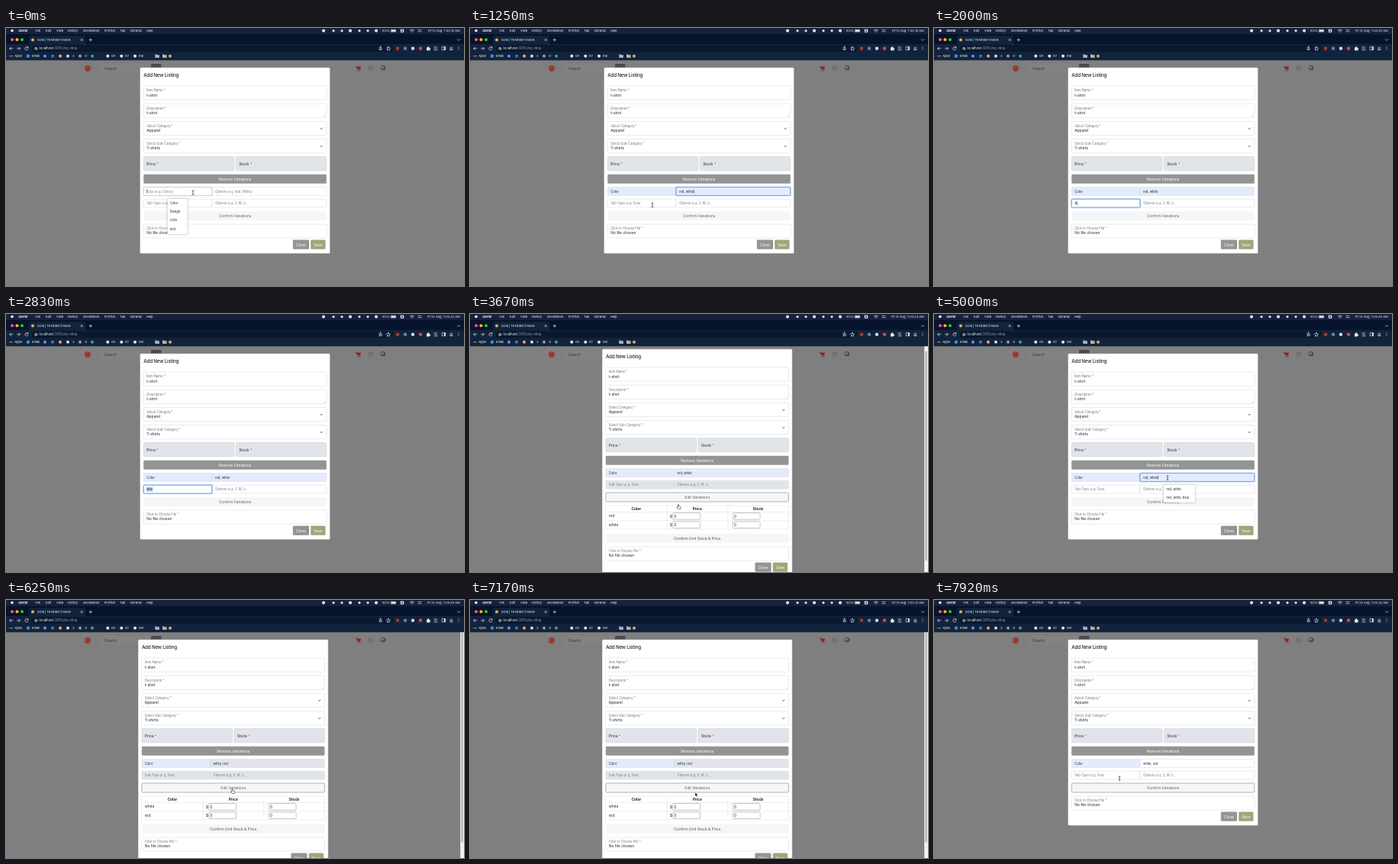
Write an HTML page that moves like this. It is 600 by 338 pixels and loops after 8000 ms.

```html
<!DOCTYPE html>
<html lang="en">
<head>
<meta charset="utf-8">
<title>Add New Listing</title>
<style>
  html, body { margin: 0; width: 100%; height: 100%; overflow: hidden; background: #7f7f7f; }
  svg { display: block; width: 100vw; height: 100vh; }
  text { font: 5px Inter, "Open Sans", sans-serif; letter-spacing: -.012em; fill: #212529; white-space: pre; }
  .bar text { font-size: 4.1px; fill: #eef1f6; }
  .bar .dim { fill: #97a3b4; }
  .bar .b { font-weight: 700; }
  .bar .s { font-size: 3.9px; }
  .line { fill: none; stroke: #dfe4ec; stroke-width: .7; stroke-linecap: round; stroke-linejoin: round; }
  .box { fill: #fff; stroke: #d3d7dc; stroke-width: .5; }
  .off { fill: #e1e5ea; stroke: #c5cad1; }
  .label { font-size: 4.25px; fill: #70767c; }
  .star { fill: #b07070; }
  .title { font-size: 6.25px; font-weight: 500; letter-spacing: -.03em; }
  .mid { text-anchor: middle; }
  .th { font-weight: 700; text-anchor: middle; }
  .row text, .menu text { font-size: 4.2px; }
  .menu rect { fill: #fff; stroke: #d0d0d0; stroke-width: .3; filter: drop-shadow(0 .8px 1.2px rgba(0,0,0,.3)); }
  .btn { fill: #949494; }
  .white { fill: #fff; }
  .soft { fill: #f5f6f7; stroke: none; }
  .soft.on { stroke: #7d838a; stroke-width: .6; }
  #ring { fill: none; stroke: #6f9ff0; stroke-width: .8; }
  #glow { fill: none; stroke: #0d6efd; stroke-opacity: .24; stroke-width: 1.5; }
  .hide { display: none; }
</style>
</head>
<body>
<svg viewBox="0 0 600 338" preserveAspectRatio="none">
  <rect width="600" height="338" fill="#7f7f7f"/>

  <!-- page header -->
  <circle cx="107" cy="53" r="4" fill="#993a35"/>
  <path d="M125 46.5H190V59H125Z" fill="#828282"/>
  <text x="129" y="54.9" fill="#333" style="fill:#383838">Search</text>
  <rect x="190" y="47" width="13.5" height="12" rx="1.2" fill="#4b4b4b"/>
  <path d="M458 50h1.4l1 4h3.4l.8-3h-4.6z" fill="#8d2020" stroke="#8d2020" stroke-width=".7"/>
  <g fill="#8d2020"><circle cx="460.8" cy="55.7" r=".8"/><circle cx="463.4" cy="55.7" r=".8"/></g>
  <path d="M475 50.5h5.6v4.8H475zM475 52.5h5.6" fill="none" stroke="#5f5f5f" stroke-width=".6"/>
  <circle cx="494" cy="52.3" r="3.3" fill="#39536b"/>
  <circle cx="493.2" cy="51.6" r="1.5" fill="#7e8d91"/>

  <!-- scrollbar -->
  <g id="scroll">
    <rect x="595.2" y="42" width="4.8" height="296" fill="#f3f3f3"/>
    <rect id="thumb" x="596.2" y="43" width="2.8" height="275" rx="1.4" fill="#bcbcbc"/>
  </g>

  <g id="modal">
    <rect id="sheet" x="175.4" y="51.8" width="249.2" height="243.8" rx="1.6" fill="#fff" stroke="#6f6f6f" stroke-width=".4"/>
    <text class="title" x="180.3" y="63.6">Add New Listing</text>
    <g id="fields"></g>
    <rect class="btn" x="180.2" y="191.8" width="239.6" height="12" rx="1.3"/>
    <text class="mid white" x="300" y="199.7">Remove Variations</text>

    <g class="row">
      <rect id="typeBox" class="box" x="180.3" y="208.6" width="89.7" height="10.8" rx="1"/>
      <rect id="optBox" class="box" x="270" y="208.6" width="149.7" height="10.8" rx="1"/>
      <rect id="subBox" class="box" x="180.3" y="224.2" width="89.7" height="10.8" rx="1"/>
      <rect id="subOptBox" class="box" x="270" y="224.2" width="149.7" height="10.8" rx="1"/>
      <rect id="glow" height="11.6" rx="1.3"/>
      <rect id="ring" height="10.8" rx="1"/>
      <rect id="mark" x="184.1" y="226.6" height="5.9" fill="#a9cbf8"/>
      <text id="typeText" x="184.2" y="215.5"></text>
      <text id="optText" x="274" y="215.5"></text>
      <text id="subText" x="184.2" y="231.1"></text>
      <text id="subOptText" x="274" y="231.1">Options (e.g. S, M, L)</text>
      <rect id="caret" width=".5" height="5.2" fill="#222"/>
    </g>

    <rect id="confirmBtn" class="soft" x="180.3" y="240" width="239.5" height="12" rx="1.3"/>
    <text id="confirmText" class="mid" x="300" y="248" style="fill:#5f6368"></text>

    <g id="table">
      <path d="M180.3 257.2H419.8V288H180.3ZM180.3 265.5H419.8M180.3 276.7H419.8M260.3 257.2V288M340.2 257.2V288" fill="none" stroke="#dadde1" stroke-width=".5"/>
      <text class="th" x="220.3" y="263.1">Color</text>
      <text class="th" x="300.2" y="263.1">Price</text>
      <text class="th" x="379.7" y="263.1">Stock</text>
      <g id="cells"></g>
      <rect class="soft" x="180.3" y="293.8" width="239.5" height="12" rx="1.3"/>
      <text class="mid" x="300" y="301.7" style="fill:#4f5357">Confirm Unit Stock &amp; Price</text>
    </g>

    <g id="low">
      <rect class="box" x="180.3" y="257" width="239.5" height="18" rx="1.3"/>
      <text class="label" x="184.2" y="264.2">Click to Choose File <tspan class="star">*</tspan></text>
      <text x="184.2" y="270.3">No file chosen</text>
      <rect class="btn" x="375.8" y="277.6" width="21.2" height="12.2" rx="1.3"/>
      <text class="mid white" x="386.4" y="285.6">Close</text>
      <rect x="399.2" y="277.6" width="19.3" height="12.2" rx="1.3" fill="#a0a67a"/>
      <text class="mid white" x="408.9" y="285.6">Save</text>
    </g>

    <g id="menuType" class="menu">
      <rect x="211.6" y="223.6" width="26.2" height="46.4" rx="1"/>
      <text x="214.8" y="231">Color</text><text x="214.8" y="242.2">Design</text>
      <text x="214.8" y="253.3">color</text><text x="214.8" y="264.5">test</text>
    </g>
    <g id="menuOpt" class="menu">
      <rect x="300.8" y="223.6" width="41.4" height="23.4" rx="1"/>
      <text x="304.5" y="231">red, white</text><text x="304.5" y="242.2">red, white, blue</text>
    </g>
  </g>

  <!-- browser and menu bar -->
  <g class="bar">
    <rect width="600" height="8" fill="#17213c"/>
    <rect y="8" width="600" height="13.5" fill="#06142b"/>
    <rect y="21" width="600" height="21.3" fill="#12233c"/>
    <path d="M28 21.3q2 0 2-2V12q0-1.8 1.8-1.8h70.4q1.8 0 1.8 1.8v7.3q0 2 2 2z" fill="#12233c"/>
    <rect x="33.5" y="22.6" width="474" height="8.6" rx="4.3" fill="#0a182d"/>
    <circle cx="8" cy="3.5" r="1.8" fill="#f2f4f8"/>
    <text class="b" x="16.2" y="5">Zelmir</text>
    <g id="menus"></g>
    <g id="dots"></g>
    <text x="492.5" y="5" class="s">100%</text>
    <path class="line" d="M504.5 2.2h6v2.8h-6z"/><path d="M505 2.6h5v2h-5z" fill="#fff"/>
    <rect x="516.8" y="1.4" width="4.4" height="4.4" rx=".8" fill="#f0f2f6"/>
    <text x="517.6" y="5" class="b" style="fill:#17213c;font-size:3.8px">A</text>
    <path class="line" d="M529.3 2.8q2.7-2.2 5.4 0M530.5 4.1q1.5-1.2 3 0M532 5.4v.1M540 2.4h4M540 4.7h4"/>
    <text id="clock" x="594.6" y="5" text-anchor="end"></text>

    <circle cx="35" cy="15.6" r="2" fill="#dfb260"/>
    <text x="40.6" y="17.1" class="s">Vuna | TR Binder's Nook</text>
    <path class="line" d="M98 14.4l2.4 2.4m0-2.4L98 16.8M109 15.6h3.6M110.8 13.8v3.6M591.4 14.8l1.7 1.7 1.7-1.7"/>
    <path class="line" d="M9 26.8H4.8m1.8-1.8L4.8 26.8l1.8 1.8M14.5 26.8h4m-1.7-1.8 1.7 1.8-1.7 1.8M28.7 25.6a2.1 2.1 0 1 0 .2 2M28.9 24.4v1.5h-1.5"/>
    <circle class="line" cx="39.2" cy="26.9" r="1.6"/><path class="line" d="M39.2 26.8v.8"/>
    <text x="43.6" y="28.4" style="font-size:4.4px">localhost<tspan class="dim">:3000/my-shop</tspan></text>
    <path class="line" d="M489 26v2.6h3.2V26M490.6 27.2v-3M489.6 25l1-1 1 1M501 24.3l.8 1.7 1.8.2-1.3 1.3.3 1.8-1.6-.9-1.6.9.3-1.8-1.3-1.3 1.8-.2z"/>
    <path class="line" d="M561 25h3.8M561 27h2.6M561 29h2M564.6 27.6v1.6M571.5 24.7h4.2v4h-4.2z"/>
    <path d="M573.8 24.7h1.9v4h-1.9z" fill="#dfe4ec"/>
    <path d="M551 25.4h1.1q.2-1.4 1.3-1.1.6.2.6 1.1h1.2v1.3q1.3.1 1 1.2-.2.6-1 .6v1H551z" fill="#dfe4ec"/>
    <circle cx="583.3" cy="26.8" r="2.4" fill="#5e6c7a"/><path d="M581.2 27.9a2.4 2.4 0 0 0 4.2 0z" fill="#b9c0c4"/>
    <g fill="#e4e8ee"><circle cx="593" cy="25.1" r=".5"/><circle cx="593" cy="26.8" r=".5"/><circle cx="593" cy="28.5" r=".5"/></g>
    <g id="marks"></g>
    <path d="M195.3 34.6h2l.6.7h3v3.7h-5.6zM205 34.6h2l.6.7h3v3.7H205z" fill="#aab4c2"/>
  </g>

  <!-- pointers -->
  <g id="ptr">
    <path id="pi" d="M-1.3-2.7q1 0 1.3.7.3-.7 1.3-.7M0-2V2.2M-1.3 2.8q1 0 1.3-.6.3.6 1.3.6" fill="none" stroke="#111" stroke-width=".7"/>
    <path id="pa" d="M0 0V5.2L1.2 4.1 2 6l.9-.4L2.1 3.8H3.7Z" fill="#111" stroke="#fff" stroke-width=".4"/>
    <path id="ph" d="M-.6.2Q0-.5.5.2V2.3l2 .4q.8.2.7 1.1L2.7 6H-.6L-2 3.8q-.2-.9.6-.7l.8.6Z" fill="#fff" stroke="#111" stroke-width=".5" stroke-linejoin="round"/>
  </g>
</svg>

<script>
const LOOP = 8000, STEP = 1000 / 12;
const $ = id => document.getElementById(id);
const show = (id, on) => $(id).classList.toggle('hide', !on);
const fill = (id, html) => { $(id).innerHTML = html; };
const text = (x, y, s, cls = '') => `<text x="${x}" y="${y}" class="${cls}">${s}</text>`;
const dot = (x, y, r, c) => `<circle cx="${x}" cy="${y}" r="${r}" fill="${c}"/>`;
const star = ' <tspan class="star">*</tspan>';

// form fields
const frame = (x, y, w, cls = '') => `<rect class="box ${cls}" x="${x}" y="${y}" width="${w}" height="18.2" rx="1.3"/>`;
const field = ([label, value, pick], i) => {
  const y = 76 + i * 23.2;
  return frame(180.3, y, 239.5) + text(184.2, y + 7.3, label + star, 'label') + text(184.2, y + 13.6, value) +
    (pick ? `<path d="M411.5 ${y + 8.5}l1.6 1.6 1.6-1.6" fill="none" stroke="#343a40" stroke-width=".8"/>` : '');
};
fill('fields', [['Item Name', 't-shirt'], ['Description', 't-shirt'],
  ['Select Category', 'Apparel', 1], ['Select Sub-Category', 'T-shirts', 1]].map(field).join('') +
  '<path d="M416.3 116.6l2.5-2.5M417.7 116.6l1.1-1.1" stroke="#888" stroke-width=".3"/>' +
  frame(180.3, 168.6, 118.6, 'off') + frame(301.2, 168.6, 118.6, 'off') +
  text(184.2, 179.6, 'Price' + star) + text(305.2, 179.6, 'Stock' + star));

// price table
const input = (x, y) => `<rect x="${x}" y="${y}" width="36" height="8.6" rx="1.4" fill="#fff" stroke="#8b8b8b" stroke-width=".5"/>` +
  text(x + 1.7, y + 6.1, '0');
const cells = names => names.map((n, i) => {
  const y = 266.6 + i * 11.3;
  return text(184.2, y + 5.6, n) + text(264.2, y + 6.1, '$') + input(268, y) + input(346.5, y);
}).join('');

// bar contents
fill('menus', [['File', 38.4], ['Edit', 52], ['View', 66], ['History', 80.6], ['Bookmarks', 101.2], ['Profiles', 128.8],
  ['Tab', 149.2], ['Window', 162.4], ['Help', 183.8]].map(([s, x]) => text(x, 5, s)).join(''));
fill('dots', [416, 429, 440, 451, 463, 474, 485].map((x, i) => dot(x, 3.6, i % 3 ? 1.6 : 2.1, '#dde2ea')).join('') +
  ['#ff5f57', '#febc2e', '#28c840'].map((c, i) => dot(8 + i * 6.5, 15.3, 2, c)).join('') +
  ['#b8322c', '#5b86c9', '#d9d9d9', '#e0463c'].map((c, i) => dot(513 + i * 10, 26.8, 2.2, c)).join(''));
fill('marks', ['#e56b5d', '#6fb7e8', '#e8c15f'].map((c, i) => dot(4.8 + i * 1.6, 36.8, .7, c)).join('') +
  text(11.2, 38.3, 'Apps') + dot(29, 36.8, 2.2, '#3d8fdd') + text(34, 38.3, 'Email') +
  [[51, '#5b9be6'], [61, '#3f74d8'], [71, '#e9b04b'], [81, '#d8dbe0'], [97, '#8f9aa8'], [113, '#37b07c']]
    .map(([x, c]) => dot(x, 36.8, 2, c)).join('') + text(87, 38.3, '3') + text(103.5, 38.3, '6') +
  [['GA', 133.3], ['SY', 151.3], ['XW', 169]].map(([s, x]) => dot(x, 36.8, 2, '#e6e9ee') + text(x + 4.4, 38.3, s)).join('') +
  dot(215, 36.8, 2.1, '#d8a93e'));

// timed values: last entry whose time has come
const at = (list, t) => list.reduce((v, e) => t >= e[0] ? e[1] : v, list[0][1]);
const within = (t, a, b) => t >= a && t < b;

const OPT = [[0, ''], [570, 'r'], [660, 're'], [740, 'red'], [990, 'red, white'], [5080, 'd, white'], [5160, ', white'],
  [5240, 'white'], [5490, 'white,'], [5580, 'white, '], [5660, 'white, r'], [5740, 'white, re'], [5820, 'white, red']];
const SUB = [[0, ''], [1740, 's'], [1910, 'si'], [2080, 'siz'], [2240, 'size'], [2910, '']];
const FOCUS = [[0, 'type'], [490, 'opt'], [1490, 'sub'], [3240, 'button'], [4740, 'opt'], [6160, 'button']];
// time, x, y, pointer kind
const PATH = [[0, 245, 215.5, 'i'], [80, 243, 217, 'i'], [250, 225, 230, 'a'], [420, 225, 230, 'a'], [750, 239, 232, 'i'],
  [1330, 239, 232, 'i'], [1500, 228, 230, 'i'], [1740, 228, 230, ''], [2910, 240, 233, 'i'], [3080, 280, 243, 'h'],
  [3240, 284, 246, 'h'], [3420, 280, 248, 'h'], [3660, 273, 249.5, 'h'], [3920, 275, 248, 'h'], [4250, 286, 246, 'h'],
  [4420, 286, 246, 'h'], [4580, 296, 232, 'i'], [4740, 306, 214.5, 'i'], [5080, 306, 214.5, ''], [5820, 306, 216, 'i'],
  [6000, 300, 240, 'h'], [6160, 296.5, 247.5, 'h'], [6420, 296.5, 247.5, 'h'], [6660, 287, 270, 'i'], [6910, 292, 286, 'a'],
  [7170, 295, 252, 'h'], [7250, 294, 247, 'h'], [7410, 292, 247, 'h'], [7910, 243, 233.5, 'i'], [8000, 243, 233.5, 'i']];
const SCROLL = [[3400, 0], [3580, 6], [3740, 6], [3920, 0]];

const mix = (list, t, k) => {
  const i = list.findIndex(e => e[0] > t);
  if (i < 0) return list[list.length - 1][k];
  if (!i) return list[0][k];
  const a = list[i - 1], b = list[i], p = (t - a[0]) / (b[0] - a[0]);
  return a[k] + (b[k] - a[k]) * p * p * (3 - 2 * p);
};
const put = (id, value, hint) => {
  $(id).textContent = value || hint;
  $(id).style.fill = value ? '#212529' : '#777d83';
};
const attrs = (id, set) => Object.entries(set).forEach(([k, v]) => $(id).setAttribute(k, v));

function draw(t) {
  const done = within(t, 3240, 4410) || within(t, 6160, 7410);
  const focus = at(FOCUS, t), opt = at(OPT, t), sub = at(SUB, t);
  const type = t < 410 ? '' : 'Color';
  const scroll = mix(SCROLL, t, 1);

  attrs('modal', { transform: `translate(${done ? -2.4 : 0} ${-scroll})` });
  attrs('sheet', { height: done ? 297.8 : 243.8 });
  attrs('low', { transform: `translate(0 ${done ? 54 : 0})` });
  attrs('thumb', { y: 43 + scroll * .92 });
  show('scroll', done);
  show('table', done);
  if (done) fill('cells', cells(t < 5000 ? ['red', 'white'] : ['white', 'red']));

  put('typeText', type, 'Type (e.g. Colour)');
  put('optText', opt, 'Options (e.g. Red, White)');
  put('subText', sub, 'Sub-Type (e.g. Size)');
  put('subOptText', '', 'Options (e.g. S, M, L)');
  const plain = done ? '#e1e5ea' : '#fff', auto = '#e3ebfc';
  $('typeBox').style.fill = type ? auto : plain;
  $('optBox').style.fill = within(t, 990, 5080) ? auto : plain;
  $('subBox').style.fill = $('subOptBox').style.fill = plain;

  const inField = focus !== 'button';
  const x = focus === 'opt' ? 270 : 180.3, y = focus === 'sub' ? 224.2 : 208.6, w = focus === 'opt' ? 149.7 : 89.7;
  attrs('ring', { x, y, width: w });
  attrs('glow', { x: x - .4, y: y - .4, width: w + .8 });
  show('ring', inField);
  show('glow', inField);
  $('ring').style.opacity = $('glow').style.opacity = t < 80 ? .3 : 1;

  const picked = within(t, 2570, 2910);
  const value = { type, opt, sub }[focus];
  const len = value ? $(focus + 'Text').getComputedTextLength() : 0;
  attrs('mark', { width: picked ? len + .4 : 0 });
  const back = within(t, 5080, 5240) ? len : 0;
  attrs('caret', { x: x + 4 + len - back, y: y + 2.8 });
  show('caret', inField && !picked);

  $('confirmBtn').classList.toggle('on', !inField);
  $('confirmText').textContent = done ? 'Edit Variations' : 'Confirm Variations';
  show('menuType', t < 410);
  show('menuOpt', within(t, 570, 990) || within(t, 4820, 5490));

  const sec = Math.floor(16.7 + t / 500);
  $('clock').textContent = `Fri 12 Aug  7:00:${sec} AM`;

  const kind = at(PATH.map(p => [p[0], p[3]]), t);
  attrs('ptr', { transform: `translate(${mix(PATH, t, 1)} ${mix(PATH, t, 2)})` });
  for (const k of 'iah') show('p' + k, k === kind);
}

function tick() {
  const t = performance.now() % LOOP;
  draw(Math.floor((t + 4) / STEP) * STEP % LOOP);
  requestAnimationFrame(tick);
}
tick();
</script>
</body>
</html>
```
